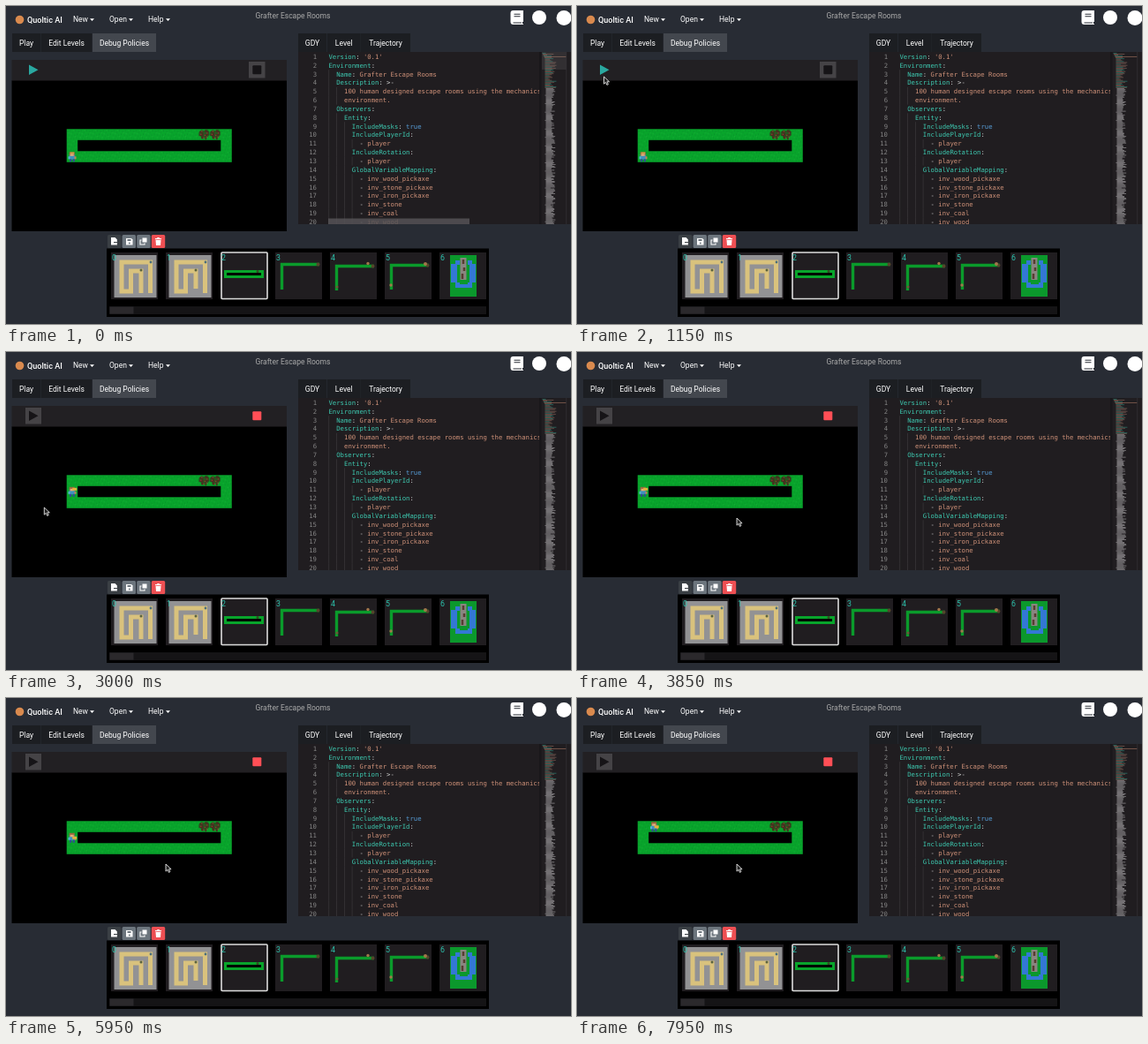
Recreate the animation shown at these times as an HTML page. Size 640 px wide and 360 px high, loop 8000 ms.

```html
<!DOCTYPE html>
<html lang="en">
<head>
<meta charset="utf-8">
<title>Grafter Escape Rooms</title>
<style>
  html, body { margin: 0; width: 100%; height: 100%; overflow: hidden; background: #282c34; }
  svg { display: block; width: 640px; height: 360px; }
  text { font: 8.53px Roboto, sans-serif; fill: #fff; white-space: pre; }
  .code text { font: 7.28px "DejaVu Sans Mono", monospace; fill: #d4d4d4; }
  .code .num { fill: #858585; text-anchor: end; }
  .code .key { fill: #3dc9b0; }
  .code .val { fill: #ce9178; }
  .code .bool { fill: #569cd6; }
</style>
</head>
<body>
<svg id="stage" viewBox="0 0 640 360">
  <defs>
    <clipPath id="editorClip"><rect x="331" y="52" width="273" height="195"/></clipPath>
    <pattern id="grass" width="12.47" height="12.5" patternUnits="userSpaceOnUse" x="68.7" y="139.3">
      <rect width="13" height="13" fill="#08a52b"/>
      <path d="M1 2v2M4 1v2M7 3v2M10 1v2M3 6v2M6 7v2M9 6v2M12 5v2M1 10v2M5 10v2M8 10v2M11 9v2" stroke="#07932a" stroke-width=".8"/>
      <path d="M2 4v1M8 1v1M5 5v1M10 8v1M3 9v1" stroke="#1cb03a" stroke-width=".8"/>
    </pattern>
    <g id="bush">
      <path d="M0 4l3-3 3 1 3-2 3 3v4l-2 2-2-1-2 3-3 0-1-3-2 0z" fill="#2a5420"/>
      <path d="M1 3l4 2M7 2l4 2M1 7l4-1M7 7l4-1M4 6v5M8 8v4" stroke="#4a2c1f" stroke-width="1.7"/>
      <path d="M3 2.5h1M9 4.5h1M2 6h1M6.5 7h1M9 9h1M5 10h1" stroke="#a33a34" stroke-width="1.3"/>
    </g>
  </defs>
</svg>
<script>
const LOOP = 8000, TILE = 12.47, ROW = 12.5, MAP_X = 68.7, MAP_Y = 139.3;
const BAR = '#222023', DISABLED = '#454346';
const stage = document.getElementById('stage');
const rect = (x, y, w, h, fill, more = '') =>
  `<rect x="${x}" y="${y}" width="${w}" height="${h}" fill="${fill}" ${more}/>`;
const path = (d, fill, more = '') => `<path d="${d}" fill="${fill}" ${more}/>`;
const line = (d, color, width) => path(d, 'none', `stroke="${color}" stroke-width="${width}"`);
const label = (x, y, s, more = '') => `<text x="${x}" y="${y}" ${more}>${s}</text>`;
const dot = (x, y, r, fill) => `<circle cx="${x}" cy="${y}" r="${r}" fill="${fill}"/>`;
const random = i => { const v = Math.sin(i * 12.9898) * 43758.5453; return v - Math.floor(v); };

function header() {
  const menu = [[76, 'New', 95], [117, 'Open', 139], [161, 'Help', 181]].map(([x, s, caret]) =>
    label(x, 18.4, s) + path(`M${caret} 14.2h5l-2.5 2.7z`, '#fff')).join('');
  const book = path('M574.5 5H586v13h-1v2h1v1h-11.500q-3 0-3-3v-10q0-3 3-3z', '#fff') +
    line('M575.5 9.3h7M575.5 11.7h7M574.5 19h9.500', '#282c34', 1.1);
  return dot(15.5, 15.5, 4.8, '#d98a4e') + label(24, 18.6, 'Quoltic AI', 'style="font-size:9.1px;font-weight:500"') +
    menu + label(282.5, 14, 'Grafter Escape Rooms', 'style="fill:#aaa"') +
    book + dot(604, 13, 8, '#fff') + dot(632, 13.5, 8.5, '#fff');
}

function tabs() {
  return [[7, 32, 'Play'], [39.5, 58, 'Edit Levels'], [98, 72, 'Debug Policies', true],
    [331, 32, 'GDY'], [363.7, 38, 'Level'], [402, 56, 'Trajectory']].map(([x, w, s, active]) =>
    rect(x, 31, w, 21, active ? '#43474e' : '#1c1e22') +
    label(x + w / 2, 45, s, 'text-anchor="middle"')).join('');
}

function game() {
  return rect(6.5, 61, 311.5, 24, BAR) + rect(6.5, 84.5, 311.5, 170.5, '#000') +
    rect(22, 63, 18, 18.5, BAR, 'id="playBack"') + path('M26 66.5l10.5 5.7-10.5 5.7z', '#2aa8a0', 'id="play"') +
    rect(275, 63, 18.5, 18.5, BAR, 'id="stopBack"') + rect(279.3, 67.2, 10, 10, '#161417', 'id="stop" rx="1"') +
    rect(MAP_X, MAP_Y, TILE * 15, ROW * 3, 'url(#grass)') +
    rect(MAP_X + TILE, MAP_Y + ROW, TILE * 13, ROW, '#000') +
    [12, 13].map(c => `<use href="#bush" x="${MAP_X + TILE * c}" y="${MAP_Y}"/>`).join('') +
    '<g id="player"></g>';
}

function minimap() {
  let lines = '';
  for (let i = 0; i < 183; i++) {
    const top = i < 38, inset = top ? Math.min(i, 6) * .5 : 3 + (i % 9 ? 1 : 0);
    const width = i === 4 ? 25 : top ? 4 + random(i) * 9 : 6 + random(i) * 5;
    const tone = i === 4 ? '#a5745f' : !top ? '#aaa8aa' : i % 3 ? '#8a6a5d' : '#2f8a7c';
    lines += rect(607.5 + inset, (53 + i * 1.06).toFixed(2), width.toFixed(1), .75, tone, 'opacity=".8"');
  }
  return lines;
}

function editor() {
  const source = `Version: '0.1'
Environment:
  Name: Grafter Escape Rooms
  Description: >-
    100 human designed escape rooms using the mechanics
    environment.
  Observers:
    Entity:
      IncludeMasks: true
      IncludePlayerId:
        - player
      IncludeRotation:
        - player
      GlobalVariableMapping:
        - inv_wood_pickaxe
        - inv_stone_pickaxe
        - inv_iron_pickaxe
        - inv_stone
        - inv_coal
        - inv_wood`;
  const span = (kind, s) => `<tspan class="${kind}">${s}</tspan>`;
  const lines = source.split('\n').map((s, i) => {
    const y = 59.9 + i * 9.84;
    const [, indent, key, rest] = s.match(/^(\s*)(\w+(?=:))?(.*)$/);
    const tail = rest.replace(/^(:? ?(?:- )?)(.*)$/, (_, mark, value) =>
      mark + (value === '>-' ? '&gt;-' : span(value === 'true' ? 'bool' : 'val', value)));
    let guides = '';
    for (let g = 0; g < indent.length; g += 2) guides += rect(365.5 + g * 4.38, y - 7.4, .6, 9.9, '#403d40');
    return guides + label(352, y, i + 1, 'class="num"') +
      label(365.5 + indent.length * 4.38, y, (key ? span('key', key) : '') + tail);
  }).join('');

  return rect(331, 52, 309, 195, '#201d20') +
    `<g class="code" clip-path="url(#editorClip)">${lines}</g>` +
    rect(604, 52, 2.5, 195, '#19171a') + minimap() + rect(634.5, 52, .6, 195, '#39373a') +
    `<g id="scrollbars">${rect(365, 240.5, 160, 6.5, '#555356', 'opacity=".85"')}${rect(607, 52, 27.5, 20, '#777', 'opacity=".2"')}</g>`;
}

function toolButtons() {
  const icons = [
    path('M119 262h4.500l2.500 2.500v6h-7z', '#fff') + line('M122 267.500h6M126 265.500l2 2-2 2', '#3a3f44', 1),
    path('M136 263h6l1.5 1.5v6H136z', '#fff') + rect(137.5, 264, 4, 2, '#6c757d') + dot(139.8, 268.4, 1, '#6c757d'),
    rect(154.5, 262.5, 5, 5, '#fff') + line('M153.5 265h-1.5v5h5v-1.5', '#fff', 1.1),
    path('M169 263h2l.5-1h2l.5 1h2v1.200h-7zM169.500 265h6l-.5 6h-5z', '#fff')];
  const colors = ['#3a3f44', '#6c757d', '#6c757d', '#ee4f53'];
  return [115, 131.6, 148.2, 164.8].map((x, i) =>
    rect(x, 259, 15.4, 15, colors[i], 'rx="1.5"') + icons[i]).join('');
}

function levels() {
  const maze = (x, end) => rect(x + 3.5, 282, 48, 48, '#929294') +
    line(`M${x + 44.5} 325V290H${x + 12}V323H${x + 22.5}V300H${x + 34}V${end}`, '#d9c27d', 5) +
    dot(x + 34, 299, 1.5, '#5b6440') + dot(x + 45, 290, 1.4, '#496f7d');
  const corner = (x, y, bottom) => line(`M${x + 7.5} ${bottom}V${y}H${x + 50}`, '#0a9b2b', 3.4) +
    dot(x + 48.5, y, 2, '#55452b');
  const pictures = [
    x => maze(x, 325),
    x => maze(x, 320),
    x => rect(x + 4, 299, 45, 9, '#08a52b') + rect(x + 7, 302, 39, 3, '#000') + dot(x + 42, 300.5, 1.5, '#324b20'),
    x => corner(x, 292.5, 321),
    x => corner(x, 294.5, 322) + dot(x + 43, 291.5, 1.7, '#a0784b') + dot(x + 8, 318, 1.5, '#6b5636'),
    x => corner(x, 293.5, 321) + dot(x + 46, 292, 2, '#a0784b') + dot(x + 7, 316, 1.7, '#a0784b'),
    x => rect(x + 12, 282, 30, 47, '#0b982c') +
      path(`M${x + 13} 292h5v-4h5v27h9v-27h5v4h4v21h-4v6h-19v-6h-5z`, '#3378d4') +
      rect(x + 20, 293, 14, 20, '#0b982c') + rect(x + 23.5, 285, 7, 25, '#8a8580') +
      line(`M${x + 27} 287v5M${x + 28} 296v4M${x + 26} 303v6`, '#573d31', 2.5)];
  return rect(114, 274.5, 433, 77.5, '#000') + pictures.map((draw, i) => {
    const x = 119 + i * 62;
    return rect(x, 279, 53, 53, '#201d20') + draw(x) +
      (i === 2 ? rect(x + 1, 279, 52, 52.5, 'none', 'stroke="#ddd" stroke-width="1.6" rx="1"') : '') +
      label(x + 1, 287.5, i, 'style="fill:#2cc3ad;font-size:8.8px"');
  }).join('') + rect(117, 340, 427, 9, '#151416') + rect(117.5, 340.5, 27, 8, '#2b292c');
}

const cursor = path('M0 0v8.2l2-1.8 1.4 3 1.5-.7-1.4-2.9h2.6z', '#222', 'id="cursor" stroke="#fff" stroke-width=".8"');
stage.insertAdjacentHTML('beforeend', header() + tabs() + game() + editor() + toolButtons() + levels() + cursor);

const [player, pointer, scrollbars, play, playBack, stop, stopBack] =
  ['player', 'cursor', 'scrollbars', 'play', 'playBack', 'stop', 'stopBack'].map(id => document.getElementById(id));

// Time, column, row and the direction faced
const moves = [[0, 0, 2, 0, -1], [2700, 0, 1, 1, -1], [4400, 0, 0, 0, -1],
  [5300, 0, 1, 1, 0], [6950, 0, 0, 0, -1], [7550, 1, 0, 1, 0]];
const pointerStops = [[300, 420, 120], [850, 36, 82], [1150, 30.5, 80], [1450, 30, 76],
  [1900, 25.5, 133], [2600, 31, 147], [3000, 43.3, 176], [3450, 181, 188], [LOOP, 181, 188]];

function sprite(dx, dy) {
  return rect(3, 3.5, 6.5, 6, '#3d91bd') + rect(3, 1, 6, 4, '#9a673d') + rect(4, 3, 4, 2.5, '#dfac7c') +
    rect(1.8, 6, 2, 3, '#55b3d0') + rect(8.8, 6, 2, 3, '#bb8358') +
    rect(3.3, 9, 2.2, 3, '#314d91') + rect(7, 9, 2.2, 3, '#314d91') +
    (dx ? rect(6.5, 5 + dy * 3, 5, 3, '#e2b33c') : rect(4, 1.3, 4.5, 1.6, '#d1a44a'));
}

function pointerAt(t) {
  const i = pointerStops.findIndex(s => s[0] > t), a = pointerStops[i - 1], b = pointerStops[i];
  const u = (t - a[0]) / (b[0] - a[0]), k = u * u * (3 - 2 * u);
  return [a[1] + (b[1] - a[1]) * k, a[2] + (b[2] - a[2]) * k];
}

let pose;
function draw(t) {
  const running = t >= 1500, now = moves.filter(m => m[0] <= t).pop();
  play.setAttribute('fill', running ? '#161417' : '#2aa8a0');
  playBack.setAttribute('fill', running ? DISABLED : BAR);
  stop.setAttribute('fill', running ? '#ff4f56' : '#161417');
  stopBack.setAttribute('fill', running ? BAR : DISABLED);
  scrollbars.setAttribute('opacity', Math.max(0, Math.min(1, (1000 - t) / 500)));
  if (pose !== now) {
    pose = now;
    const [, col, row, dx, dy] = now;
    player.setAttribute('transform', `translate(${MAP_X + col * TILE} ${MAP_Y + row * ROW})`);
    player.innerHTML = sprite(dx, dy);
  }
  pointer.setAttribute('visibility', t < 300 ? 'hidden' : 'visible');
  if (t >= 300) pointer.setAttribute('transform', `translate(${pointerAt(t)})`);
}

const start = performance.now();
function tick() {
  draw((performance.now() - start) % LOOP);
  requestAnimationFrame(tick);
}
tick();
</script>
</body>
</html>
```
